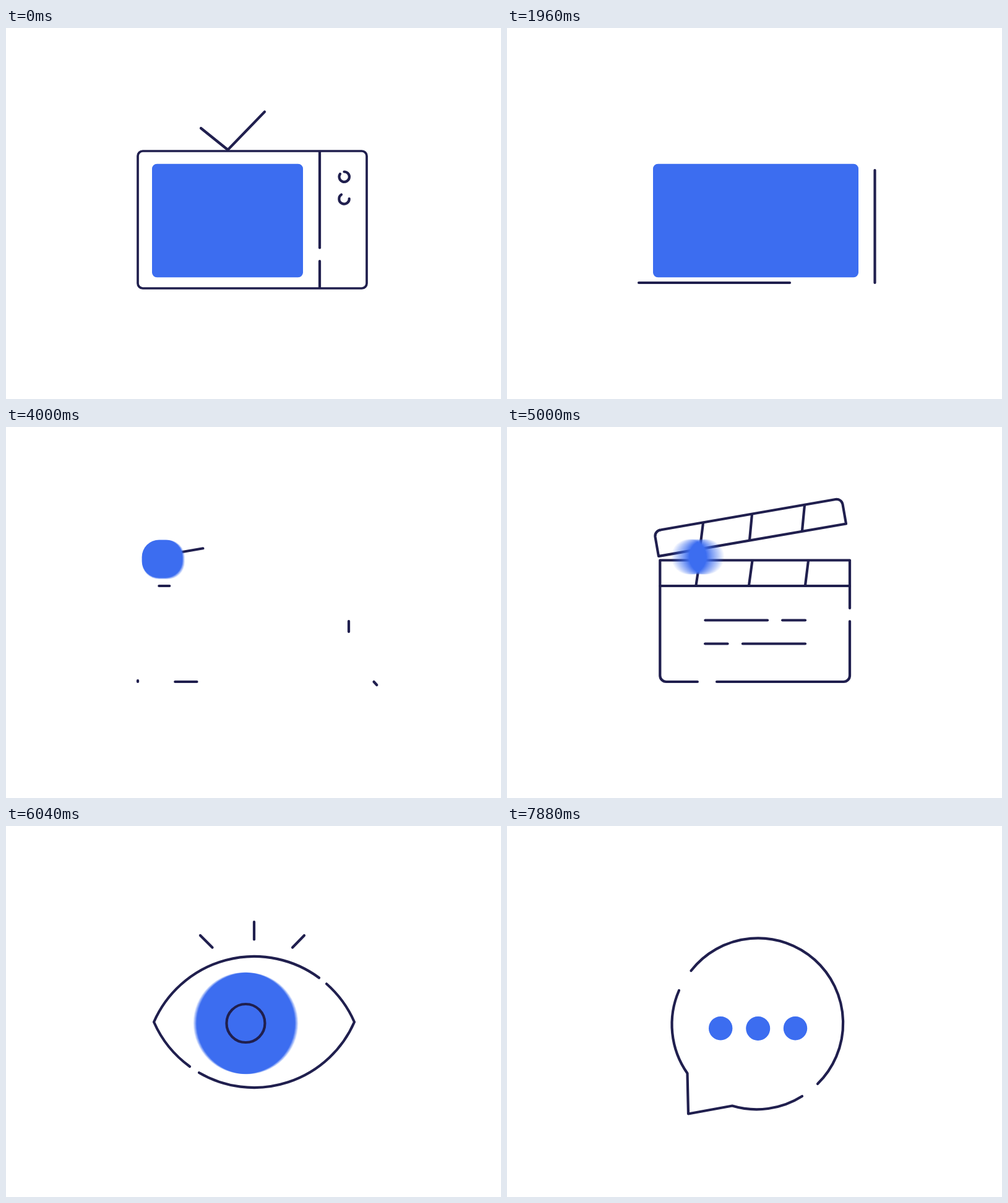
Animation, 800 px wide and 600 px high, one loop 8 s. Source, as an HTML page with a canvas:

```html
<!DOCTYPE html>
<html lang="en">
<head>
<meta charset="utf-8">
<title>Line icons</title>
<style>
html, body { margin: 0; width: 100%; height: 100%; overflow: hidden; background: #fff; }
canvas { display: block; }
</style>
</head>
<body>
<canvas width="800" height="600"></canvas>
<script>
const LOOP = 8000, STEP = 40, SHUTTER = 20, SAMPLES = 15;
const NAVY = '#201f4e', BLUE = '#3c6df0';
const ctx = document.querySelector('canvas').getContext('2d');
const layer = document.createElement('canvas');
layer.width = 800;
layer.height = 600;
const blurCtx = layer.getContext('2d');

const clamp = v => Math.min(1, Math.max(0, v));
const mix = (a, b, p) => a + (b - a) * p;
const cubic = p => p < .5 ? 4 * p ** 3 : 1 - 4 * (1 - p) ** 3;
const sine = p => (1 - Math.cos(Math.PI * p)) / 2;
const phase = (t, from, to, ease = cubic) => ease(clamp((t - from) / (to - from)));

// A stroke grows along its path during `show` and is eaten from its start during `hide`.
function stroke(d, show, hide, width = 4.2) {
  const el = document.createElementNS('http://www.w3.org/2000/svg', 'path');
  el.setAttribute('d', d);
  return { path: new Path2D(d), length: el.getTotalLength(), show, hide, width };
}

function drawStroke({ path, length, show, hide, width }, t) {
  const end = show ? phase(t, ...show) : 1;
  const start = hide ? phase(t, ...hide) : 0;
  if (end - start <= 0) return;
  const whole = start === 0 && end === 1;
  ctx.setLineDash(whole ? [] : [length * (end - start), length * 2]);
  ctx.lineDashOffset = -length * start;
  ctx.lineWidth = width;
  ctx.stroke(path);
}

const group = (show, hide, paths) => paths.map(d => stroke(d, show, hide));

const tv = [
  stroke('M221 199H575A8 8 0 0 1 583 207V413A8 8 0 0 1 575 421H221A8 8 0 0 1 213 413V207A8 8 0 0 1 221 199Z',
    null, [880, 1640], 3.7),
  ...group(null, [880, 1440], [
    'M418 135.5L358.5 197L315 162',
    'M507 200V355.5', 'M507 420V377',
    'M546.5 232.5A8.2 8.2 0 1 1 540 236',
    'M554.7 276A8.2 8.2 0 1 1 542 269.5'
  ])
];

const laptop = [
  stroke('M594.5 412V196A8 8 0 0 0 586.5 188H221A8 8 0 0 0 213 196V412', [1640, 2480], [3360, 4060]),
  stroke('M213 412H594.5', [1640, 2220], [3400, 4000]),
  stroke('M213 412L166 462L640.5 462.5L594.5 412', [2160, 2950], [3400, 4100]),
  stroke('M435 309L382 280V338L423 315.5', [2580, 3360], [3400, 3840])
];

const clapper = [
  stroke('M245 209L548 156.5L542.5 125A10 10 0 0 0 531 117L249 166.3A10 10 0 0 0 239.5 177.5Z',
    [3700, 4700], [4960, 5560]),
  ...group([3760, 4760], [4960, 5600], [
    'M308.5 412H257.3A10 10 0 0 1 247.3 402V215.5H554V293',
    'M554 314V402A10 10 0 0 1 544 412H339',
    'M247.3 257H554'
  ]),
  ...group([4200, 4740], [4960, 5360], [
    'M317 155L312 195', 'M396 141L392 183', 'M481 126L477 167.5',
    'M311.5 216L305.5 256', 'M396.5 216L391 256', 'M487 216L482 256',
    'M320 312.5H421', 'M445 312.5H482',
    'M320 350.5H356.5', 'M380.5 350.5H482'
  ])
];

const eye = [
  ...group([5080, 5720], [6800, 7320], [
    'M297 389A176.8 176.8 0 0 1 239 317A176.8 176.8 0 0 1 506 245.5',
    'M518 255.3A176.8 176.8 0 0 1 563 317A176.8 176.8 0 0 1 312 399'
  ]),
  ...group([5740, 6020], [6800, 7120], ['M333.5 196.5L314 177', 'M401 183.5V155', 'M463 196.5L482 177'])
];
const pupil = stroke('M31 0A31 31 0 1 1 -31 0A31 31 0 1 1 31 0Z', [5240, 5700], [6800, 7160]);

const bubble = group([6960, 7640], null, [
  'M502 417A137.5 137.5 0 1 0 297.5 234',
  'M278 266A137.5 137.5 0 0 0 291.5 400L293 465.5L364 452.5A137.5 137.5 0 0 0 477 437'
]);

function irisAt(t) {
  const look = phase(t, 5862, 6342, sine), settle = phase(t, 6400, 6680, sine);
  const shrink = phase(t, 6780, 7320);
  let x = mix(247.5, 369, phase(t, 4880, 5120)) - 10 * phase(t, 5120, 5720);
  x += 94 * look - 17.5 * settle;
  let y = mix(210, 316.8, phase(t, 5000, 5440)) + 7.2 * look;
  let r = mix(28.5, 82.2, phase(t, 5000, 5440));
  return { x: mix(x, 405.7, shrink), y: mix(y, 327.5, shrink), r: mix(r, 19.5, shrink) };
}

// Blue shapes as [left, top, width, height, corner radius].
function blueAt(t) {
  const disc = (x, y, r) => [x - r, y - r, 2 * r, 2 * r, r];
  if (t < 4500) {
    const grow = phase(t, 2000, 2480);
    const screen = [236, mix(219.7, 209.7, grow), mix(244, 332, phase(t, 1080, 1760)), mix(183.6, 202.3, grow), 8];
    const dot = disc(247.5, 210, 28.5), morph = phase(t, 3400, 4160);
    return [screen.map((v, i) => mix(v, dot[i], morph))];
  }
  const { x, y, r } = irisAt(t), shapes = [disc(x, y, r)];
  const split = phase(t, 7320, 7880, p => 1 - (1 - p) ** 3);
  if (split > 0) {
    for (const side of [-1, 1]) shapes.push(disc(405.6 + side * 60.4 * split, 327.2, 19.2));
  }
  return shapes;
}

function fillShapes(target, shapes) {
  target.beginPath();
  for (const shape of shapes) target.roundRect(...shape);
  target.fill();
}

function drawBlue(t) {
  const first = blueAt(t - SHUTTER / 2), last = blueAt(t + SHUTTER / 2);
  if (String(first) === String(last)) {
    ctx.fillStyle = BLUE;
    fillShapes(ctx, first);
    return;
  }
  // Motion blur: add up equal coverage samples, then tint them.
  blurCtx.globalCompositeOperation = 'lighter';
  blurCtx.clearRect(0, 0, 800, 600);
  blurCtx.fillStyle = '#000';
  blurCtx.globalAlpha = 1 / SAMPLES;
  for (let i = 0; i < SAMPLES; i++) {
    fillShapes(blurCtx, blueAt(t + SHUTTER * (i / (SAMPLES - 1) - .5)));
  }
  blurCtx.globalAlpha = 1;
  blurCtx.globalCompositeOperation = 'source-in';
  blurCtx.fillStyle = BLUE;
  blurCtx.fillRect(0, 0, 800, 600);
  ctx.drawImage(layer, 0, 0);
}

function draw(t) {
  ctx.fillStyle = '#fff';
  ctx.fillRect(0, 0, 800, 600);
  ctx.strokeStyle = NAVY;
  ctx.lineCap = ctx.lineJoin = 'round';
  const drawAll = strokes => strokes.forEach(s => drawStroke(s, t));
  drawAll(clapper);
  drawBlue(t);
  [tv, laptop, eye, bubble].forEach(drawAll);
  const { x, y } = irisAt(t);
  ctx.save();
  ctx.translate(x, y);
  drawStroke(pupil, t);
  ctx.restore();
}

function frame() {
  draw(Math.floor(performance.now() % LOOP / STEP) * STEP);
  requestAnimationFrame(frame);
}
frame();
</script>
</body>
</html>
```
